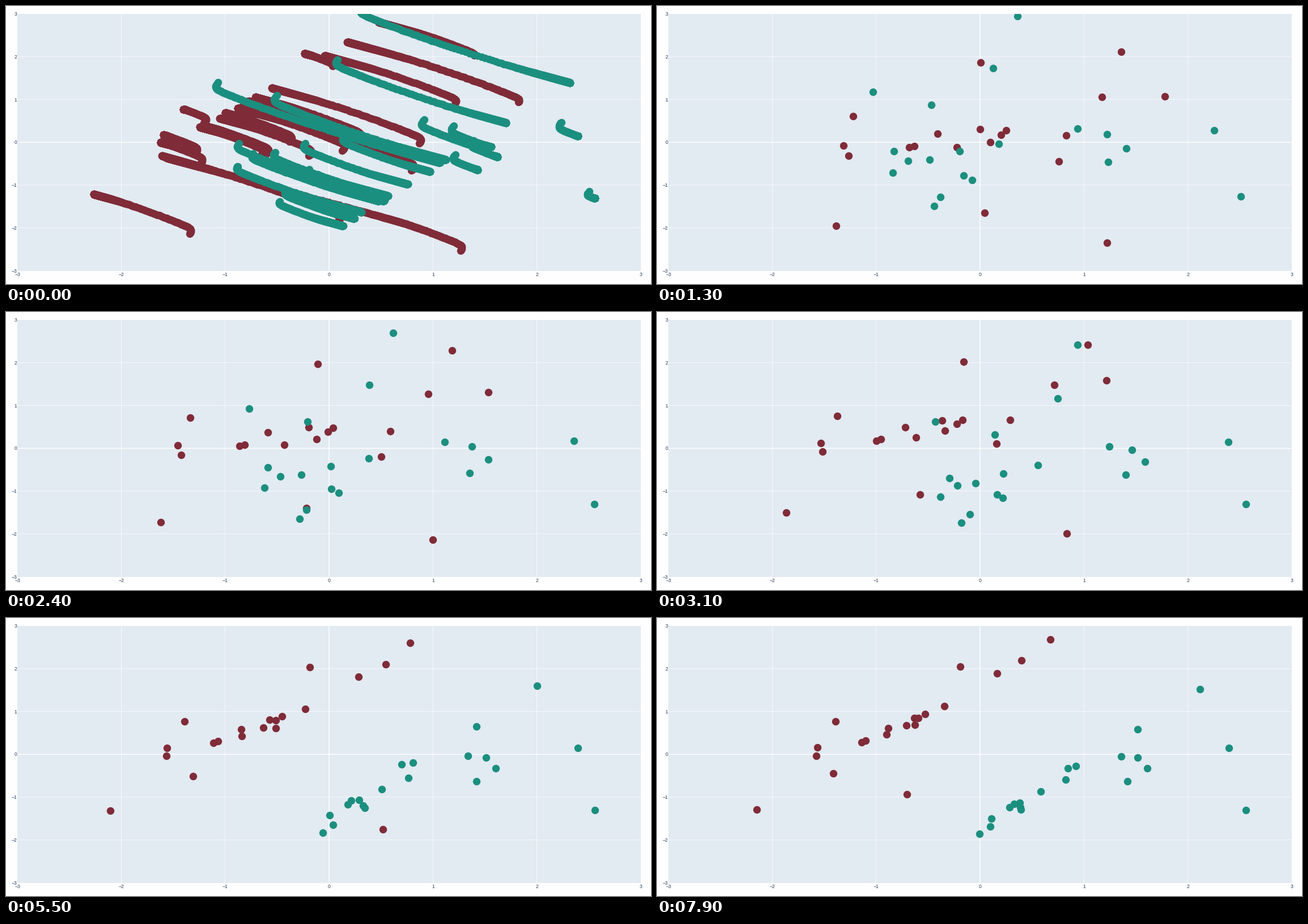
Write a matplotlib script that moves like this. It is 1138 by 492 pixels and loops after 8 s.

```python
import numpy as np
import matplotlib.pyplot as plt
from matplotlib.animation import FuncAnimation
from matplotlib.patches import Rectangle

W, H, DPI = 1138, 492, 100
LEFT, TOP, RIGHT, BOTTOM = 20, 14, 1120, 468.5
ORIGIN = np.array([570, 241.25])
UNIT = np.array([1100 / 6, -454.5 / 6])
RED, GREEN, INK = "#802b38", "#1b8f7f", "#2a3f5f"
px = 72 / DPI

# Times in ms.
STEP, DT = 100, 10
T_FIRST, T_SEED, T_LAST = 500, 1300, 21000
RATE = 0.0039

# The only data: where each dot is at T_SEED, in pixels. All motion follows
# from the descent rule below.
RED_SEED = [(819, 81), (571, 100), (785, 161), (896, 160), (346, 195),
            (495, 226), (570, 218), (616, 220), (607, 228), (588, 241),
            (722, 229), (709, 275), (329, 247), (338, 265), (445, 250),
            (454, 248), (529, 250), (578, 366), (316, 389), (794, 419)]
GREEN_SEED = [(636, 18), (593, 110), (381, 152), (484, 175), (742, 217),
              (794, 227), (828, 252), (796, 276), (983, 220), (1030, 337),
              (603, 244), (418, 257), (443, 274), (481, 272), (534, 257),
              (416, 295), (541, 300), (556, 308), (500, 338), (489, 354)]


def logistic(v):
    return 1 / (1 + np.exp(-v))


def weights(t):
    """Classifier weights: they grow and turn slowly after a short transient."""
    size = 0.2 + 2.3 * logistic((t - 3265) / 600)
    slope = 0.665 + 0.35 * logistic((3100 - t) / 700)
    transient = np.exp((T_FIRST - t) / 200)
    return np.array([size - 0.7 * transient, -slope * size - transient])


def velocity(pos, sign, t):
    """Descent on the squared error of a sigmoid, taken on the inputs."""
    w = weights(t)
    p = logistic(sign * (pos @ w))
    return RATE * (sign * p * (1 - p) ** 2)[:, None] * w


def simulate(seed, sign):
    start = (np.array(seed) - ORIGIN) / UNIT

    def run(t_end, dt):
        pos, out = start, []
        for t in range(T_SEED, t_end, dt):
            pos = pos + velocity(pos, sign, t + dt / 2) * dt
            out.append(pos)
        return out

    path = run(T_FIRST, -DT)[::-1] + [start] + run(T_LAST, DT)
    return np.array(path) * UNIT + ORIGIN


paths = [simulate(RED_SEED, -np.ones(20)), simulate(GREEN_SEED, np.ones(20))]

fig = plt.figure(figsize=(W / DPI, H / DPI), dpi=DPI, facecolor="#fefefe")
ax = fig.add_axes([0, 0, 1, 1])
ax.set_xlim(0, W)
ax.set_ylim(H, 0)
ax.axis("off")

area = Rectangle((LEFT, TOP), RIGHT - LEFT, BOTTOM - TOP, fc="#e2eaf2", lw=0,
                 zorder=0)
ax.add_patch(area)


def rule(xs, ys, width):
    ax.plot(xs, ys, color="white", lw=width * px, zorder=1, snap=False,
            solid_capstyle="butt")


for v in range(-3, 4):
    x, y = ORIGIN + UNIT * v
    if abs(v) < 3:
        width = 0.72 if v else 1.44
        rule([x, x], [TOP, BOTTOM], width)
        rule([LEFT, RIGHT], [y, y], width)
    label = str(v).replace("-", "\u2212")
    style = dict(family="Liberation Sans", size=8.6 * px, color=INK,
                 va="baseline")
    ax.text(x, 478, label, ha="center", **style)
    ax.text(19.5, y + 3.1, label, ha="right", **style)

dots = []
for z, color in enumerate((RED, GREEN)):
    line, = ax.plot([], [], "o", color=color, ms=13.4 * px, mew=0, zorder=2 + z)
    line.set_clip_path(area)
    dots.append(line)


def draw(frame):
    t = frame * STEP
    for line, path in zip(dots, paths):
        if t < T_FIRST:
            points = path[::4].reshape(-1, 2)      # every pose at once
        else:
            points = path[(t - T_FIRST) // DT]
        line.set_data(points[:, 0], points[:, 1])
    return dots


anim = FuncAnimation(fig, draw, frames=80, interval=STEP, repeat=True,
                     repeat_delay=0, blit=False)
plt.show()
```
